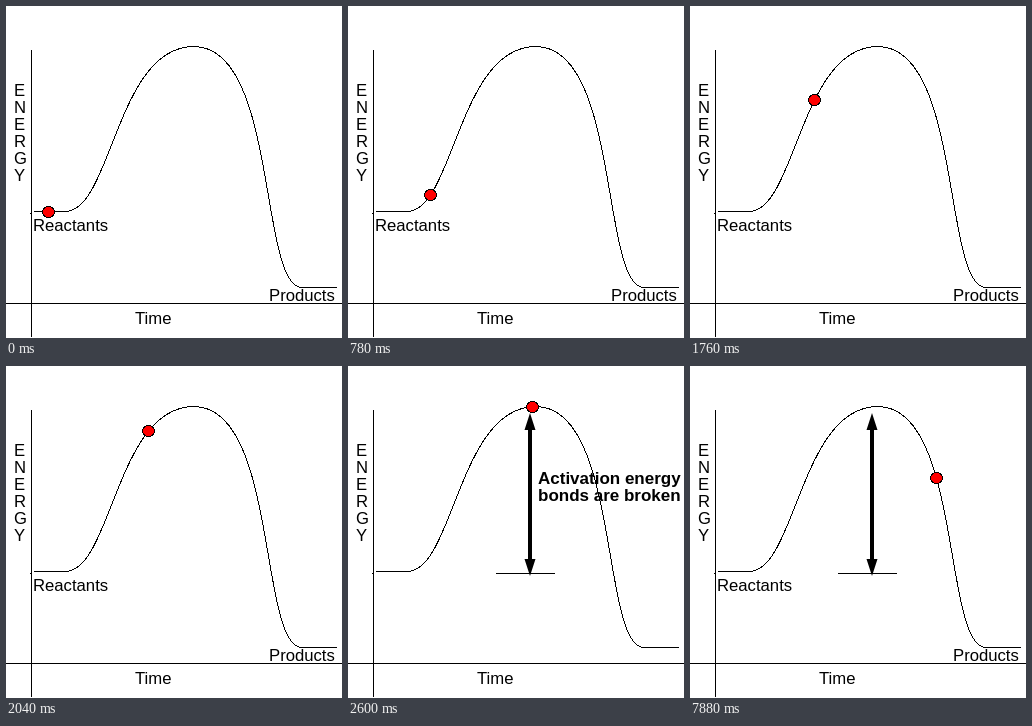
An HTML page for the animation above (8 s loop, 336x332 px).

```html
<!DOCTYPE html>
<html lang="en">
<head>
<meta charset="utf-8">
<title>Reaction energy curve</title>
<style>
  html, body { margin: 0; width: 100%; height: 100%; overflow: hidden; background: #fff; }
  svg { display: block; width: 336px; height: 332px; }
  text { font: 16.7px "Liberation Sans", Arial, sans-serif; }
  .bold text { font-size: 17px; font-weight: bold; }
  .line, #ball { stroke: #000; shape-rendering: crispEdges; }
  .line { fill: none; }
</style>
</head>
<body>
<svg viewBox="0 0 336 332">
  <path class="line" d="M25.5 44V331M0 297.5H336M24 207.5H26"/>
  <path id="curve" class="line" d="M28 205.5H59C106 205.5 110 40.5 188 40.5C272 40.5 253 281.5 296 281.5H331"/>
  <g id="axisLabels">
    <g id="energy"></g>
    <text x="129" y="318">Time</text>
  </g>
  <g id="stateLabels">
    <text x="27" y="225">Reactants</text>
    <text x="263" y="295">Products</text>
  </g>
  <g id="arrow">
    <path class="line" d="M148 207.5H207"/>
    <path d="M182 47L187.5 64H184V193H187.5L182 210L176.5 193H180V64H176.5Z"/>
  </g>
  <g id="note" class="bold">
    <text x="190" y="118">Activation energy</text>
    <text x="190" y="135">bonds are broken</text>
  </g>
  <ellipse id="ball" rx="6" ry="5.5" fill="#f00"/>
</svg>
<script>
const LOOP = 8000, STEP = 140, LEAD_IN = 360;
const PEAK_STEP = 15;

const el = id => document.getElementById(id);
const show = (id, visible) => el(id).setAttribute("visibility", visible ? "visible" : "hidden");
const clamp = (v, lo, hi) => Math.min(hi, Math.max(lo, v));
const curve = el("curve");

// Distance along the curve at which it reaches a given x
function lengthAtX(x) {
  let lo = 0, hi = curve.getTotalLength();
  for (let i = 0; i < 24; i++) {
    const mid = (lo + hi) / 2;
    if (curve.getPointAtLength(mid).x < x) lo = mid; else hi = mid;
  }
  return lo;
}

// The ball rolls at an even speed between these steps
const keys = [[0, 42.5], [3, 82.5], [9, 124.5], [12, 154.5], [PEAK_STEP, 184.5], [16, 208.5], [18, 246.5]]
  .map(([step, x]) => ({ step, distance: lengthAtX(x) }));

function ballAt(step) {
  const next = Math.max(1, keys.findIndex(key => key.step >= step));
  const a = keys[next - 1], b = keys[next];
  const part = (step - a.step) / (b.step - a.step);
  return curve.getPointAtLength(a.distance + (b.distance - a.distance) * part);
}

// Steps taken so far, with a short rest on the slope and a long one at the peak
function stepAt(t) {
  const rests = clamp(t - 780, 0, 140) + clamp(t - 2600, 0, 4860);
  return Math.max(0, Math.floor((t - LEAD_IN - rests) / STEP));
}

[..."ENERGY"].forEach((letter, i) => {
  const text = document.createElementNS("http://www.w3.org/2000/svg", "text");
  text.setAttribute("x", 8);
  text.setAttribute("y", 90 + 17 * i);
  text.textContent = letter;
  el("energy").append(text);
});

function draw(t) {
  const step = stepAt(t);
  const { x, y } = ballAt(step);
  el("ball").setAttribute("cx", Math.floor(x + 0.01) + 0.5);
  el("ball").setAttribute("cy", Math.round(y));

  const blank = step === 1;
  const atPeak = step === PEAK_STEP;
  show("axisLabels", !blank);
  show("stateLabels", !blank && !atPeak);
  show("arrow", step >= PEAK_STEP);
  show("note", atPeak);
}

const begin = performance.now();
function tick() {
  draw((performance.now() - begin) % LOOP);
  requestAnimationFrame(tick);
}
tick();
</script>
</body>
</html>
```
